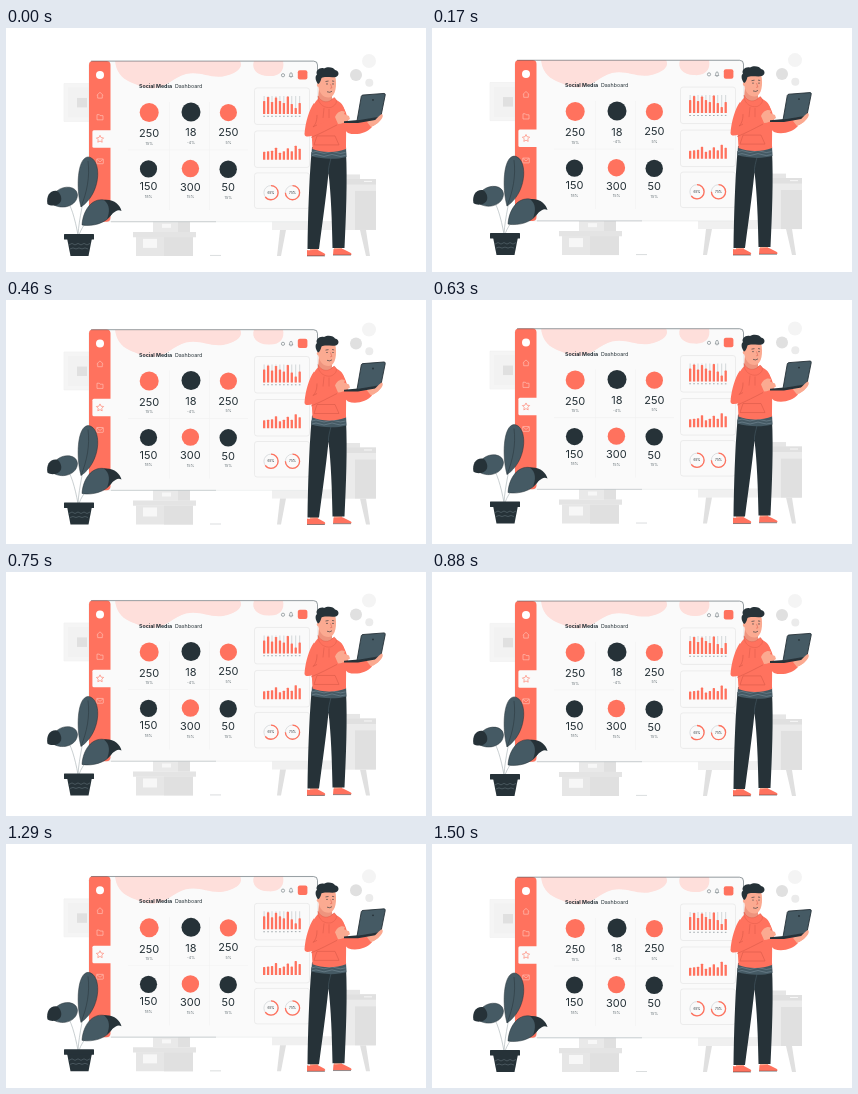
Recreate the animation shown at these times as an HTML page with a canvas. Size 420 by 244 pixels, loop 1.54 s.

```html
<!DOCTYPE html>
<html lang="en">
<head>
<meta charset="utf-8">
<title>Dashboard</title>
<style>
  html, body { margin: 0; width: 100%; height: 100%; overflow: hidden; background: #fff; }
  canvas { display: block; width: 420px; height: 244px; }
</style>
</head>
<body>
<canvas id="stage"></canvas>
<script>
const canvas = document.getElementById('stage');
const ctx = canvas.getContext('2d');
const ratio = window.devicePixelRatio || 1;
canvas.width = 420 * ratio;
canvas.height = 244 * ratio;

const LOOP = 1540, STEPS = 37;
const CORAL = '#ff725e', RUST = '#d85948', DARK = '#263238', SLATE = '#455a64', SKIN = '#fbaa91', PALE = '#fafafa';

function paint(fill, stroke, width = 0.6) {
  if (fill) { ctx.fillStyle = fill; ctx.fill(); }
  if (stroke) { ctx.strokeStyle = stroke; ctx.lineWidth = width; ctx.stroke(); }
}
function shape(d, fill, stroke, width) {
  const path = new Path2D(d);
  if (fill) { ctx.fillStyle = fill; ctx.fill(path); }
  if (stroke) { ctx.strokeStyle = stroke; ctx.lineWidth = width || 0.6; ctx.stroke(path); }
}
function box(x, y, w, h, fill, radius = 0, stroke, width) {
  ctx.beginPath();
  ctx.roundRect(x, y, w, h, radius);
  paint(fill, stroke, width);
}
function disc(x, y, r, fill, stroke, width) {
  ctx.beginPath();
  ctx.arc(x, y, r, 0, Math.PI * 2);
  paint(fill, stroke, width);
}
function text(str, x, y, size, { weight = 400, align = 'center', color = DARK } = {}) {
  ctx.font = `${weight} ${size}px Inter, sans-serif`;
  ctx.textAlign = align;
  ctx.textBaseline = 'alphabetic';
  ctx.fillStyle = color;
  ctx.fillText(str, x, y);
}

function drawRoom() {
  box(58, 55.5, 26, 38, '#f5f5f5', 0, '#f0f0f0');
  box(62, 59.5, 22, 30, '#f2f2f2');
  box(71, 70, 10, 9.5, '#e0e0e0');

  disc(363, 33, 7, '#f4f4f4');
  disc(350, 47, 6, '#e0e0e0');
  disc(363.3, 54.7, 4, '#ebebeb');

  // Stacked boxes
  box(147, 193, 37, 11, '#e9e9e9');
  box(172, 193, 12, 11, '#e0e0e0');
  box(156, 196, 9, 4, '#f7f7f7');
  box(130, 209, 57, 19, '#e6e6e6');
  box(158, 209, 29, 19, '#e0e0e0');
  box(127, 204, 63, 5.2, '#e4e4e4');
  box(137, 211, 14, 9, '#f7f7f7');

  // Sideboard
  box(266, 193, 103, 9, '#f0f0f0');
  shape('M274 202h6l-5 26h-4zM354 202h6l4 26h-4z', '#e0e0e0');
  box(338, 146.5, 16, 5, '#e6e6e6');
  box(336, 151, 34, 51, '#ebebeb');
  box(349, 163, 21, 39, '#e0e0e0');
  box(336, 151, 34, 5.5, '#e0e0e0');
  box(358, 153, 8, 1, '#f7f7f7');

  shape('M204 227.5H215', null, '#b4babd', 0.5);
}

function drawSidebar() {
  box(83, 33, 21.5, 160.8, CORAL, 4);
  disc(94, 47, 4, '#fff');
  const line = '#ffc9c0';
  shape('M90.8 67.4L94 64.4l3.2 3M91.7 67v3.2h4.6V67', null, line);
  shape('M91 86.7h2.3l.8 1h2.9v4.2h-6z', null, line);
  box(86.4, 102.3, 19.1, 17.5, PALE, [1.5, 0, 0, 1.5]);
  shape('M94 107.4l1.1 2.3 2.5.3-1.8 1.8.4 2.5-2.2-1.2-2.2 1.2.4-2.5-1.8-1.8 2.5-.3z', null, CORAL);
  box(90.7, 131, 6.6, 4.8, null, 0.4, line);
  shape('M90.8 131.3l3.2 2.6 3.2-2.6', null, line);
}

function drawStats() {
  const stats = [
    [143.2, 84.5, 9.5, CORAL, '250', 109.3, '15%'], [185, 84, 9.5, DARK, '18', 108.5, '-4%'],
    [222.4, 84.6, 8.6, CORAL, '250', 108, '5%'], [142.5, 141, 8.6, DARK, '150', 162, '18%'],
    [184.4, 140.6, 8.7, CORAL, '300', 162.6, '15%'], [222.2, 141.3, 8.7, DARK, '50', 163, '15%']
  ];
  shape('M163.5 74V182M203.5 74V182M122 122H242', null, '#f3f3f3', 0.7);
  for (const [x, y, r, color, value, baseline, change] of stats) {
    disc(x, y, r, color);
    text(value, x, baseline, 11);
    text(change, x, baseline + 7.6, 3.8, { color: '#6b767b' });
  }
}

function drawBars(heights, base, track) {
  heights.forEach((h, i) => {
    const x = 257 + i * 3.95;
    if (track) {
      box(x + 0.6, base - 18, 1, 18, '#d3d7d9');
      box(x + 0.3, base + 1.8, 1.6, 1, '#a0a8ac');
    }
    box(x, base - h, 2.3, h, CORAL, [0.6, 0.6, 0, 0]);
  });
}

function drawRing(x, y, share) {
  disc(x, y, 7.1, null, '#d9dcde', 0.9);
  ctx.beginPath();
  ctx.arc(x, y, 7.1, -Math.PI / 2, Math.PI * (2 * share - 0.5));
  paint(null, CORAL, 1.3);
  text(Math.round(share * 100) + '%', x, y + 1.2, 3.2);
}

function drawScreen() {
  box(83, 33, 228.5, 160.8, PALE, 4, '#dfe2e3', 0.5);
  shape('M105 193.8H210', null, '#a4acb0', 0.5);
  ctx.save();
  ctx.beginPath();
  ctx.roundRect(83, 33, 228.5, 160.8, 4);
  ctx.clip();
  shape('M109 33C110 43 115 50 124 54C132 57 138 60.5 147 60.5C160 60 168 49 180 46C194 43 202 50 217 48.5C230 46 238 40 234 33Z', '#fedfdb');
  shape('M248 33C245 41 251 48 262 48C274 49 279 42 277 33Z', '#fedfdb');
  ctx.restore();
  drawSidebar();
  shape('M85 33.2H307.5Q311.5 33.2 311.5 37V52', null, '#4e5b62', 0.55);

  text('Social Media', 133, 60.1, 5.3, { weight: 700, align: 'left' });
  text('Dashboard', 196.3, 60.1, 5.3, { align: 'right' });

  disc(277, 47.3, 1.6, null, '#7d878b', 0.7);
  shape('M283.2 48.5c.8-1 .2-3.7 1.8-3.8s1 2.8 1.8 3.8zM284.4 49.3h1.2', null, '#68747a', 0.6);
  box(291.8, 42.2, 9.6, 9.4, CORAL, 2);

  drawStats();
  for (const [y, h] of [[60, 36.5], [103, 36.5], [145, 35.5]]) {
    box(248.5, y, 55, h, PALE, 2.5, '#e6e6e6', 0.7);
  }
  drawBars([13, 17, 12, 16.5, 13, 11, 17.5, 10, 6, 11], 86, true);
  drawBars([8, 8.5, 9, 12, 7, 8.5, 11.5, 8.5, 14, 11], 131.7, false);
  drawRing(265, 164.7, 0.65);
  drawRing(286.5, 164.7, 0.75);
}

function drawPlant() {
  shape('M72 207C69 191 65 176 59 170M72 207C73 190 78 173 81 148M73 207C77 196 84 189 95 184', null, '#a5afb3', 0.6);
  shape('M75 179C70 161 71 130 82 129C96 130 96 165 75 179Z', SLATE, DARK, 0.5);
  shape('M75 179C81 164 84 149 82 133', null, DARK, 0.5);
  shape('M51 163C58 157 71 158 71.5 167C71 178 57 182 48 177C55 174 54 166 51 163Z', SLATE, DARK, 0.5);
  shape('M51 163C44 162 40 168 41.4 176C45 179 53 178 55 173C56 169 54 165 51 163Z', DARK);
  shape('M76 197C77 182 86 170 98 172C107 174 109 181 105 187C100 195 87 199 76 197Z', SLATE, DARK, 0.5);
  shape('M98 172C108 171 114 177 115.5 183C110 180 106 187 101 191C104 184 104 177 98 172Z', DARK);
  shape('M61 210H86L82.5 228H64.5Z', DARK);
  box(58, 206, 30, 5.5, DARK, 0.5);
  shape('M63 217l3-1.5 3 1.5 3-1.5 3 1.5 3-1.5 3 1.5 3-1.5M64 221l3-1 3 1 3-1 3 1 3-1 3 1', null, '#6b7b83', 0.5);
}

function drawLegs() {
  shape('M304 216h8v8h-8zM328 215h8v8h-8z', SKIN);
  shape('M301 222C304 223 309 221 312 222L318.5 225.5C320 227 319 228 317 228H301Z', CORAL);
  shape('M327.5 221C331 222 334 220 337 221L344 224.5C346 225.5 346 227 344.5 227H327Z', CORAL);
  shape('M301 228H319M327 227.2H345', null, DARK, 0.5);
  shape('M305.5 124H340C341.5 152 340 190 338.5 220H326.5C326 192 325 166 322.5 145C320 170 316 198 313 221H301.5C302 188 303 154 305.5 124Z', DARK);
  shape('M322.5 145C322 140 324 135 325 130', null, SLATE, 0.6);
  shape('M306 119H340L340.5 129C329 132 315 131 305.3 128Z', SLATE);
  shape('M306 124.5q4-2 8 0t8 0 8 0 9.5 0M306 127.5q4-2 8 0t8 0 8 0 9.5 0', null, '#8095a0', 0.5);
}

function drawPerson() {
  drawLegs();
  // Far arm
  shape('M330 75C338 76 341 85 342 94L362 93L366 99C361 105 350 108 342 105L331 95Z', CORAL);
  shape('M361 94C364 90 369 88 374 87L376 89C374 94 368 98 365 99Z', SKIN);
  // Torso
  shape('M313 70C307 75 305 82 305 94L306.5 121C316 125 330 125 340 121C340 108 341 91 338 80C336 74 330 71 324 70Z', CORAL);
  shape('M311 108H329L333 117H308Z', null, RUST, 0.6);
  // Head
  shape('M313 58H326V71C324 76 316 76 312 71Z', '#ee947e');
  shape('M312 48C313 44 329 43 329.8 51C331 62 328 69.5 322.5 69.5C317 69.5 313 65 312 57Z', SKIN);
  disc(312.8, 57, 2, SKIN);
  shape('M312 56C309 52 309 48 311 46.5C309 43 314 39 318 40.5C322 38 328 39.5 329 42C333.5 43 333.5 47.5 330 49C325 50 319 48 315.5 50C314.5 54 313.5 55.5 312 56Z', DARK);
  disc(321, 56, 0.6, DARK);
  disc(327, 56, 0.6, DARK);
  shape('M319.5 53.6l3-.5M326 53l2.2.4M321 63.8q3 1.4 5-.5', null, DARK, 0.6);
  shape('M324.5 56l1.4 4-1.8.3', null, RUST, 0.5);
  shape('M312 68C315 75 323 76 328 69.5C332 72 331 77 325 79.5C319 80.5 312 77 312 68Z', CORAL, RUST, 0.4);
  shape('M318 80l-1 10M323 81v9', null, RUST, 0.5);
  // Near arm
  shape('M308 75C303 82 299.5 94 298.5 106C299 113 316 104 332 97L329 89L311 97C313 90 313 80 308 75Z', CORAL);
  shape('M311 87C311 94 309 97 307 99L311 97M305 109.5C314 106 323 101 331 97', null, RUST, 0.6);
  shape('M329 89C331 84 336 81.5 339 84L338 86L343 88L344 91C340 94 335 96 332 96Z', SKIN);
  // Laptop
  shape('M338 93.2L352 92L374 89L375 91L352 95L338 95Z', DARK);
  shape('M355.3 68.3Q355.8 67.2 357 67.1L378 65.5Q379.6 65.6 379.2 67.2L374.8 89L351 93Z', SLATE, DARK, 0.9);
  disc(367, 72, 0.9, DARK);
  shape('M366 95C370 92 373 87 376 86C378 88 376 91 372 95L367 98Z', SKIN);
}

function draw(now) {
  const step = Math.floor((now % LOOP + 2) * STEPS / LOOP) % STEPS;
  const time = step * LOOP / STEPS;
  const lift = 2.3 + 2.3 * Math.cos((time - 710) / LOOP * Math.PI * 2);
  ctx.setTransform(ratio, 0, 0, ratio, 0, 0);
  ctx.fillStyle = '#fff';
  ctx.fillRect(0, 0, 420, 244);
  ctx.translate(0, -lift);
  drawRoom();
  drawScreen();
  drawPlant();
  drawPerson();
}

const start = performance.now();
function tick() {
  draw(performance.now() - start);
  requestAnimationFrame(tick);
}
tick();
</script>
</body>
</html>
```
